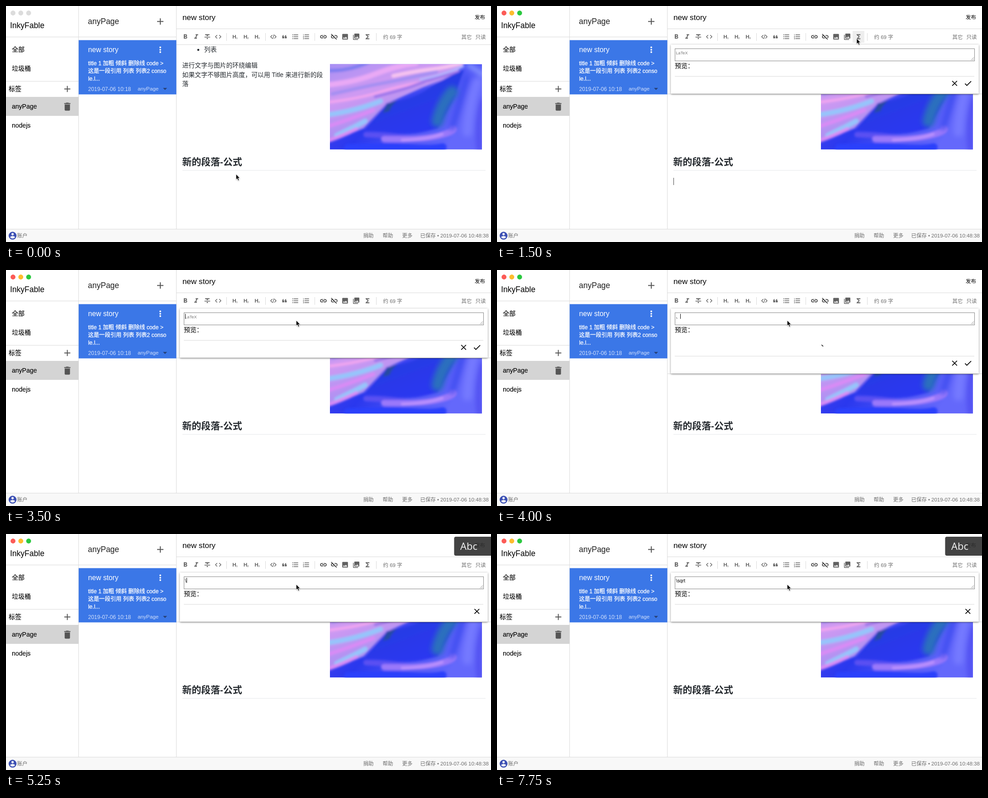
Animation of 1072 by 522 pixels, one loop 8000 ms. Source, as an HTML page:

```html
<!DOCTYPE html>
<html lang="zh">
<head>
<meta charset="utf-8">
<title>Note editor</title>
<style>
html, body { margin: 0; width: 100%; height: 100%; overflow: hidden; background: #fff; }
svg { display: block; font-family: "Liberation Sans", "Noto Sans CJK SC", "Noto Sans CJK", sans-serif; }
.rule { stroke: #dadada; fill: none; shape-rendering: crispEdges; }
.crisp { shape-rendering: crispEdges; }
.small { font-size: 11.5px; fill: #6c6c6c; }
.item { font-size: 14px; stroke: #000; stroke-width: .15; }
.prose { font-size: 13.88px; fill: #24292e; }
.excerpt { font-size: 12.3px; fill: #fff; stroke: #fff; stroke-width: .3; }
.meta { font-size: 11.7px; fill: #cfdefb; }
.tool { fill: #616161; }
.strong { fill: #1c1c1c; }
</style>
</head>
<body>
<svg width="1072" height="522" viewBox="0 0 1072 522">
  <defs>
    <filter id="soft" x="-20%" y="-20%" width="140%" height="140%"><feGaussianBlur stdDeviation="2.4"/></filter>
    <filter id="softer" x="-50%" y="-50%" width="200%" height="200%"><feGaussianBlur stdDeviation="6"/></filter>
    <filter id="drop" x="-5%" y="-20%" width="110%" height="150%"><feDropShadow dx="0" dy="1" stdDeviation="2" flood-opacity=".5"/></filter>
    <filter id="pointerShadow" x="-50%" y="-50%" width="200%" height="200%"><feDropShadow dx="0" dy="1" stdDeviation=".8" flood-opacity=".3"/></filter>
    <clipPath id="photoBox"><path d="M0 0h336v189H0z"/></clipPath>
    <linearGradient id="sea" x2="1" y2=".4"><stop stop-color="#4a45f0"/><stop offset=".45" stop-color="#2a38ee"/><stop offset="1" stop-color="#6468fb"/></linearGradient>
    <linearGradient id="sand" x2=".6" y2="1"><stop stop-color="#9f8df4"/><stop offset=".4" stop-color="#cf9af2"/><stop offset="1" stop-color="#8f86f2"/></linearGradient>
    <linearGradient id="face" x2=".6" y2="1"><stop stop-color="#2440d6"/><stop offset="1" stop-color="#2b36f2"/></linearGradient>
    <path id="add" d="M19 13h-6v6h-2v-6H5v-2h6V5h2v6h6v2z"/>
    <path id="close" d="M19 6.41L17.59 5 12 10.59 6.41 5 5 6.41 10.59 12 5 17.59 6.41 19 12 13.41 17.59 19 19 17.59 13.41 12z"/>
    <path id="check" d="M9 16.17L4.83 12l-1.42 1.41L9 19 21 7l-1.41-1.41z"/>
    <path id="trash" d="M6 19c0 1.1.9 2 2 2h8c1.1 0 2-.9 2-2V7H6v12zM19 4h-3.5l-1-1h-5l-1 1H5v2h14V4z"/>
    <path id="bold" d="M15.6 10.79c.97-.67 1.65-1.77 1.65-2.79 0-2.26-1.75-4-4-4H7v14h7.04c2.09 0 3.71-1.7 3.71-3.79 0-1.52-.86-2.82-2.15-3.42zM10 6.5h3a1.5 1.5 0 0 1 0 3h-3v-3zm3.5 9H10v-3h3.5a1.5 1.5 0 0 1 0 3z"/>
    <path id="italic" d="M10 4v3h2.21l-3.42 8H6v3h8v-3h-2.21l3.42-8H18V4z"/>
    <path id="strike" d="M10 19h4v-3h-4v3zM5 4v3h5v3h4V7h5V4H5zM3 14h18v-2H3v2z"/>
    <path id="code" d="M9.4 16.6L4.8 12l4.6-4.6L8 6l-6 6 6 6 1.4-1.4zm5.2 0l4.6-4.6-4.6-4.6L16 6l6 6-6 6-1.4-1.4z"/>
    <g id="block"><use href="#code"/><path d="M12.9 5h1.8l-3.6 14H9.3z"/></g>
    <path id="quote" d="M18 7h-3l-2 4v6h6v-6h-3zM10 7H7l-2 4v6h6v-6H8z"/>
    <path id="lines" d="M7 19h14v-2H7v2zm0-6h14v-2H7v2zm0-8v2h14V5H7z"/>
    <g id="bullets"><use href="#lines"/><circle cx="4" cy="6" r="1.5"/><circle cx="4" cy="12" r="1.5"/><circle cx="4" cy="18" r="1.5"/></g>
    <g id="numbers"><use href="#lines"/><path d="M2 4h2v4H3V5H2zM2 10h3v1l-1.8 2H5v1H2v-1l1.8-2H2zM2 16h3v4H2v-1h2v-.5H3v-1h1V17H2z"/></g>
    <path id="link" d="M3.9 12c0-1.71 1.39-3.1 3.1-3.1h4V7H7a5 5 0 0 0 0 10h4v-1.9H7c-1.71 0-3.1-1.39-3.1-3.1zM8 13h8v-2H8v2zm9-6h-4v1.9h4a3.1 3.1 0 0 1 0 6.2h-4V17h4a5 5 0 0 0 0-10z"/>
    <g id="unlink"><use href="#link"/><path d="M4 2l17 17" stroke="#fff" stroke-width="2"/><path d="M2.5 3.5l17 17" stroke="#1c1c1c" stroke-width="1.9"/></g>
    <path id="image" d="M21 19V5c0-1.1-.9-2-2-2H5c-1.1 0-2 .9-2 2v14c0 1.1.9 2 2 2h14c1.1 0 2-.9 2-2zM8.5 13.5l2.5 3.01L14.5 12l4.5 6H5l3.5-4.5z"/>
    <path id="images" d="M22 16V4c0-1.1-.9-2-2-2H8c-1.1 0-2 .9-2 2v12c0 1.1.9 2 2 2h12c1.1 0 2-.9 2-2zm-11-4l2.03 2.71L16 11l4 5H8l3-4zM2 6v14c0 1.1.9 2 2 2h14v-2H4V6H2z"/>
    <path id="sigma" d="M18 4H6v2l6.5 6L6 18v2h12v-3h-7l5-5-5-5h7z"/>
    <path id="account" d="M12 2a10 10 0 1 0 0 20 10 10 0 0 0 0-20zm0 3a3 3 0 1 1 0 6 3 3 0 0 1 0-6zm0 14.2c-2.5 0-4.71-1.28-6-3.22.03-1.99 4-3.08 6-3.08 1.99 0 5.97 1.09 6 3.08-1.29 1.94-3.5 3.22-6 3.22z"/>
  </defs>

  <path fill="#fff" d="M0 0h1072v522H0z"/>
  <path class="rule" d="M160.5 0v493M376.5 0v493M0 68.5h376M0 166.5h160M377 50.5h695M377 85.5h695"/>

  <!-- sidebar -->
  <g id="lights"><circle cx="15.5" cy="15.5" r="5.4"/><circle cx="32.7" cy="15.5" r="5.4"/><circle cx="50" cy="15.5" r="5.4"/></g>
  <text x="9" y="49" font-size="17.5">InkyFable</text>
  <path class="crisp" fill="#d4d4d4" d="M0 201h160v42H0z"/>
  <g class="item">
    <text x="13" y="101">全部</text><text x="13" y="142.5">垃圾桶</text><text x="6" y="188">标签</text>
    <text x="13" y="227">anyPage</text><text x="13" y="268.5">nodejs</text>
  </g>
  <g fill="#555">
    <use href="#add" transform="translate(124 172)scale(.96)"/>
    <use href="#trash" transform="translate(123.8 210.8)scale(.98)"/>
    <use href="#add" transform="translate(329 22.3)"/>
  </g>

  <!-- story list -->
  <text x="181" y="40" font-size="17.5" fill="#212121">anyPage</text>
  <path fill="#3b77e7" d="M160.6 75.6h215.9v119.8H160.6z"/>
  <text x="181.5" y="102" font-size="15.7" fill="#fff">new story</text>
  <g fill="#fff"><circle cx="341" cy="91.5" r="1.9"/><circle cx="341" cy="96.8" r="1.9"/><circle cx="341" cy="102" r="1.9"/></g>
  <g class="excerpt">
    <text x="181.5" y="130.5">title 1 加粗 倾斜 删除线 code &gt;</text>
    <text x="181.5" y="148">这是一段引用 列表 列表2 conso</text>
    <text x="181.5" y="165">le.l...</text>
  </g>
  <g class="meta"><text x="181.5" y="187.5" font-size="12">2019-07-06 10:18</text><text x="291" y="186.5">anyPage</text></g>
  <path fill="#263f75" d="M347 181.3h9l-4.5 4.5z"/>

  <!-- document -->
  <text x="390" y="31" font-size="17.1">new story</text>
  <text x="1036" y="28.8" font-size="11.5" font-weight="500">发布</text>
  <g class="prose">
    <circle cx="425" cy="97" r="2.3"/>
    <text x="438" y="101">列表</text><text x="389.5" y="135.7">进行文字与图片的环绕编辑</text>
    <text x="389.5" y="156.5">如果文字不够图片高度，可以用 Title 来进行新的段</text>
    <text x="389.5" y="177">落</text>
  </g>
  <g transform="translate(716 128.5)" clip-path="url(#photoBox)">
    <path fill="url(#sea)" d="M0 0h336v189H0z"/>
    <g filter="url(#soft)" fill="none" stroke-linecap="round">
      <path fill="url(#sand)" d="M-15-15H308L275 25 205 52 125 88 75 142-15 178z"/>
      <path stroke="#e9a9f5" stroke-width="12" d="M-5 46Q55 40 100 22T190-2"/>
      <path stroke="#7f7df0" stroke-width="8" d="M-5 14Q40 16 85-4"/>
      <path stroke="#a58ff2" stroke-width="8" d="M5 66Q75 50 118 42T235 17"/>
      <path stroke="#f7c4f0" stroke-width="8" d="M140 26Q185 16 220 12T290-2"/>
      <path stroke="#f2a6f0" stroke-width="6" d="M0 84Q65 76 110 62T215 38"/>
      <path stroke="#9b74ea" stroke-width="6" d="M100 72Q160 58 195 44T285 18"/>
      <path stroke="#96c4fb" stroke-width="11" d="M-5 112Q55 104 112 82M15 158Q52 140 78 126"/>
      <path stroke="#d98bf5" stroke-width="8" d="M-5 138Q45 122 96 102M-5 170Q25 160 58 144"/>
      <path stroke="#b3b6ff" stroke-width="5" d="M200 34Q244 26 294 5"/>
      <path fill="url(#face)" d="M126 86Q180 80 218 54T296 13L276 72 238 142Q185 157 147 153T79 145Q104 115 126 86z"/>
      <path fill="#254c9f" d="M117 108L126 88 150 80Q135 91 132 104z"/>
      <path stroke="#5a50f2" stroke-width="12" d="M80 156Q135 158 183 165"/>
      <path stroke="#9a78fa" stroke-width="14" d="M120 166Q205 168 242 158T272 142"/>
      <path stroke="#bc92fd" stroke-width="6" d="M160 168Q218 166 248 155"/>
      <path stroke="#2c40fb" stroke-width="18" d="M40 186Q125 182 174 186T249 184"/>
    </g>
    <g filter="url(#softer)" fill="none" stroke-linecap="round">
      <path stroke="#2a70bd" stroke-width="27" d="M270 62Q246 90 238 126"/>
      <path stroke="#3f4df0" stroke-width="12" d="M302 30Q284 95 270 140"/>
      <path stroke="#7579ff" stroke-width="22" d="M326 40Q306 94 304 150"/>
      <path stroke="#504df0" stroke-width="12" d="M338 80Q324 130 331 189"/>
      <path stroke="#8d9cff" stroke-width="9" d="M306 2L340 24"/>
    </g>
  </g>
  <text x="389.5" y="352" font-size="20.9" font-weight="700" fill="#24292e">新的段落-公式</text>
  <path class="rule" d="M390 363.5h670" style="stroke:#e6e8eb"/>
  <path id="bodyCaret" class="crisp" fill="#444" d="M390 380h1v16h-1z"/>

  <!-- toolbar -->
  <path id="hover" class="crisp" fill="#eee" d="M786 55h26v26h-26z"/>
  <g id="tools"></g>
  <path class="rule" d="M487.5 60v17M573.5 60v17M682.5 60v17M818.5 60v17"/>
  <g class="small"><text x="833.5" y="72.5">约 69 字</text><text x="1006.5" y="72.5">其它</text><text x="1037.5" y="72.5">只读</text></g>

  <!-- formula panel -->
  <g id="panel">
    <path id="sheet" fill="#fff"/><path id="sheetRule" class="rule"/>
    <path id="card" fill="#fff" filter="url(#drop)"/>
    <path fill="#fff" stroke="#858585" class="crisp" d="M393.5 94.5h662v27h-662z"/>
    <path stroke="#777" stroke-width=".8" d="M1047.5 120l6.5-6.5m-3 6.5l3-3"/>
    <text id="field" x="395.5" y="106.5"></text>
    <path id="fieldCaret" class="crisp"/>
    <text class="item" x="393" y="137" fill="#212121">预览：</text>
    <text id="preview" x="724" y="168" font-size="16" text-anchor="middle">、</text>
    <g id="foot">
      <path class="rule" d="M393 155.5h662"/>
      <use id="cancel" href="#close"/>
      <use id="accept" href="#check" transform="translate(1031 161)scale(.84)"/>
    </g>
  </g>

  <!-- status bar -->
  <path class="crisp" fill="#f8f8f8" d="M0 493h1072v29H0z"/><path class="rule" d="M0 493.5h1072"/>
  <use href="#account" fill="#3c50b4" transform="translate(4.1 497.6)scale(.87)"/>
  <g class="small">
    <text x="24.5" y="512">账户</text><text x="789.5" y="512">捐助</text><text x="832.5" y="512">帮助</text><text x="875.5" y="512">更多</text>
    <text x="915.5" y="512">已保存</text><circle cx="955" cy="508" r="1.6"/><text x="960" y="512">2019-07-06 10:48:38</text>
  </g>

  <g id="badge"><rect x="990.5" y="6" width="90" height="42" rx="4" fill="#2f2f2f" fill-opacity=".9"/>
    <text x="1004" y="35" font-size="22" fill="#f4f4f4" style="font-family:'Open Sans','Noto Sans',sans-serif">Abc</text></g>
  <path id="pointer" filter="url(#pointerShadow)" stroke="#fff" stroke-width=".8" d="M0 0v12l2.7-2.5 2 4.7 2.1-.9-2-4.5h3.7z"/>
</svg>
<script>
const LOOP = 8000;
const $ = id => document.getElementById(id);
const show = (id, on) => $(id).setAttribute('visibility', on ? 'visible' : 'hidden');
const set = (id, name, value) => $(id).setAttribute(name, value);

const icons = {
  bold: 396.5, italic: 420.5, strike: 445, code: 469, block: 591, quote: 615.5, bullets: 639.5,
  numbers: 663.5, link: 701.5, unlink: 725.5, image: 749.5, images: 774, sigma: 799
};
const iconMarkup = Object.entries(icons).map(([name, x]) =>
  `<use href="#${name}" class="${/link/.test(name) ? 'strong' : 'tool'}" transform="translate(${x - 8.4} 59.6)scale(.7)"/>`);
const headings = [500.5, 525, 549.5].map((x, i) =>
  `<g class="tool" font-weight="700"><text x="${x}" y="72" font-size="11.5">H</text><text x="${x + 8.5}" y="73" font-size="4.5">${i + 1}</text></g>`);
$('tools').innerHTML = iconMarkup.join('') + headings.join('');

// Each track lists [start ms, value...]; values hold until the next entry.
const pointer = [[0, 508.5, 372], [250, 507, 374], [750, 753.5, 118], [1000, 778, 90],
  [1250, 795, 72], [2000, 641, 118], [2250, 642.5, 113], [2500, 641.5, 111.5]];
const typed = [[0, ''], [4000, '、'], [4750, ''], [5250, '\\'], [6250, '\\sq'], [7000, '\\sqr'], [7250, '\\sqrt']];
const growth = [[0, 0], [4000, 35], [4750, 15], [5250, 0]];
const bodyCaret = [[0, 0], [250, 1], [750, 0], [1250, 1], [1750, 0], [2250, 1], [2500, 0]];
const fieldCaret = [[0, 0], [2500, 396], [3000, 0], [3500, 396], [4000, 405], [4500, 0], [5000, 396],
  [5250, 399], [5500, 0], [6000, 399], [6250, 409], [6750, 0], [7000, 413], [7250, 417], [7750, 0]];
const at = (track, t) => track.findLast(key => key[0] <= t).slice(1);

function drawPanel(t) {
  const [extra] = at(growth, t), [text] = at(typed, t), [caret] = at(fieldCaret, t);
  const bottom = 194 + extra, latin = text.startsWith('\\');
  set('sheet', 'd', `M377 85H1072V${bottom}H377z`);
  set('sheetRule', 'd', `M377 ${bottom + .5}H1072`);
  set('card', 'd', `M384.5 85.5H1064.5V${bottom}H384.5z`);
  set('foot', 'transform', `translate(0 ${extra})`);
  $('field').textContent = text || 'LaTeX';
  set('field', 'font-size', latin ? 10.6 : 9.2);
  set('field', 'fill', text ? '#000' : '#757575');
  set('fieldCaret', 'd', caret ? `M${caret} 97h1v11h-1z` : '');
  set('cancel', 'transform', `translate(${latin ? 1030.7 : 1001.4} 161)scale(.84)`);
  $('preview').style.display = text === '、' ? '' : 'none';
  $('accept').style.display = latin ? 'none' : '';
}

function draw(t) {
  const lit = t >= 250;
  [...$('lights').children].forEach((dot, i) =>
    dot.setAttribute('fill', lit ? ['#fc5b57', '#fdbc2e', '#2bc840'][i] : '#dcdcdc'));
  set('pointer', 'transform', `translate(${at(pointer, t).join(' ')})`);
  show('bodyCaret', at(bodyCaret, t)[0]);
  show('hover', t >= 1250 && t < 2000);
  show('badge', t >= 5000);
  $('panel').style.display = t >= 1500 ? '' : 'none';
  drawPanel(t);
}

const start = performance.now();
function tick() {
  draw((performance.now() - start) % LOOP);
  requestAnimationFrame(tick);
}
tick();
</script>
</body>
</html>
```
